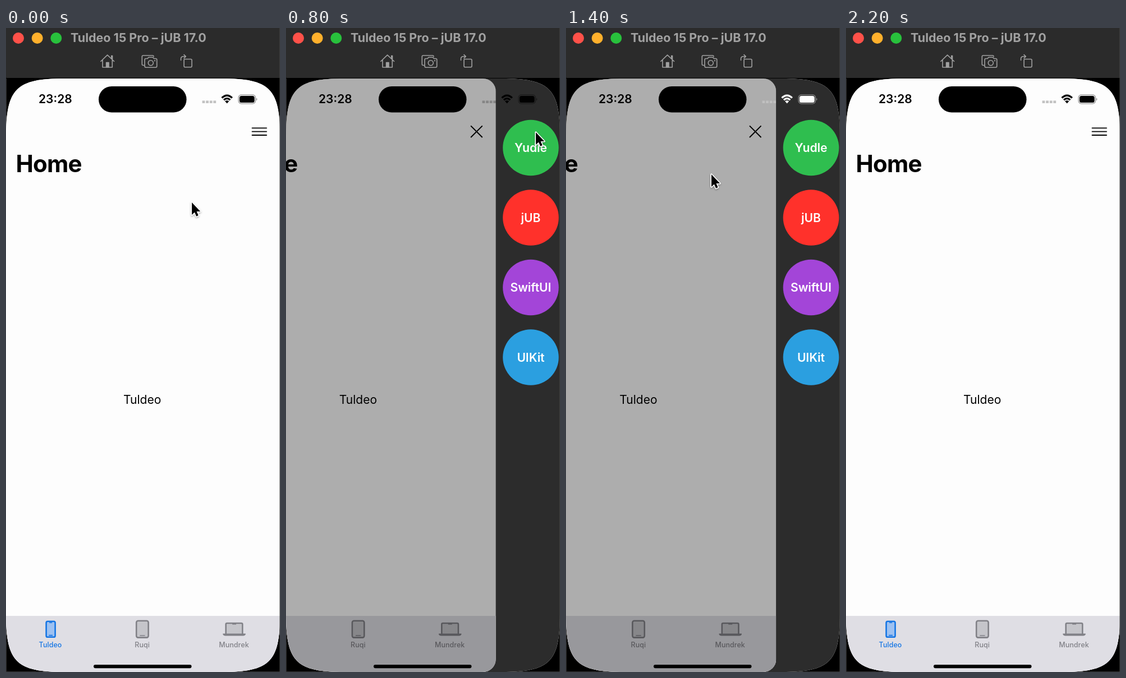
These frames come from a looping animation (488 by 1148 pixels, 2300 ms). An HTML page:

```html
<!DOCTYPE html>
<html lang="en">
<head>
<meta charset="utf-8">
<title>Side menu demo</title>
<style>
  html, body { margin: 0; width: 100%; height: 100%; overflow: hidden; background: #000; }
  svg { display: block; width: 100%; height: 100%; }
  text { font-family: Inter, "Open Sans", sans-serif; font-size: 21px; }
  .mid { text-anchor: middle; }
  .semi { font-weight: 600; }
  .tab { font-size: 12.4px; font-weight: 500; letter-spacing: .1px; }
</style>
</head>
<body>
<svg viewBox="0 0 488 1148">
  <defs>
    <clipPath id="screenClip">
      <path d="M0 194C0 108 18 90 104 90H384C470 90 488 108 488 194V1044C488 1130 470 1148 384 1148H104C18 1148 0 1130 0 1044Z"/>
    </clipPath>
    <clipPath id="panelClip"><rect id="panelShape" x="-100" y="90" width="588" height="1058"/></clipPath>
    <filter id="shadow" x="-50%" y="-50%" width="200%" height="200%">
      <feDropShadow dx="0" dy="1.5" stdDeviation="1.5" flood-opacity=".35"/>
    </filter>
  </defs>

  <!-- simulator window -->
  <rect width="488" height="1148"/>
  <rect width="488" height="89" fill="#2b2b2b"/>
  <path d="M.5 90V1148M0 1147.5H488" stroke="#333"/>
  <circle cx="22" cy="18" r="10" fill="#ff5149"/>
  <circle cx="55.7" cy="18" r="10" fill="#ffb02c"/>
  <circle cx="89.3" cy="18" r="10" fill="#28c13c"/>
  <text x="115" y="25" font-weight="700" style="font-size:21.5px" fill="#a1a1a1">Tuldeo 15 Pro – jUB 17.0</text>
  <g fill="none" stroke="#a1a1a1" stroke-width="1.6" stroke-linejoin="round" stroke-linecap="round">
    <path d="M168.8 59.5L180.6 48.2 192.6 59.5M172 57V70H189.3V57M187.8 54V49.5H189.5V55.5"/>
    <rect x="178.6" y="61.5" width="4.4" height="8.5" fill="#a1a1a1"/>
    <path d="M246 66.5H244.3Q242.3 66.5 242.3 64.5V51Q242.3 49 244.3 49H261Q263 49 263 51"/>
    <path d="M249.3 54.5H252L254 52.3H261.5L263.5 54.5H266.5Q268.7 54.5 268.7 56.5V68Q268.7 70.2 266.5 70.2H249.3Q247 70.2 247 68V56.5Q247 54.5 249.3 54.5Z"/>
    <circle cx="257.8" cy="62.3" r="4.5"/>
    <circle cx="265" cy="58.3" r=".4"/>
    <rect x="317" y="55.5" width="14" height="14.3" rx="2"/>
    <path d="M311.5 57.5V55Q311.5 50.8 316 50.8H319.5M317 47.6L320.3 50.8 317 54"/>
  </g>

  <g clip-path="url(#screenClip)">
    <rect y="90" width="488" height="1058" fill="#fdfdfd"/>
    <rect id="drawer" y="90" width="488" height="1058" fill="#2c2c2c"/>
    <g id="drawerItems"></g>

    <g id="panel" clip-path="url(#panelClip)">
      <rect x="-100" y="90" width="588" height="1058" fill="#fdfdfd"/>
      <text x="17.5" y="257" font-weight="700" style="font-size:42px;letter-spacing:-.02em">Home</text>
      <text class="mid" x="242.7" y="670">Tuldeo</text>
      <rect x="-100" y="1048" width="588" height="100" fill="#dfdee4"/>
      <g stroke="#1475e4" fill="#9dc1f1" stroke-width="2.6">
        <rect x="71.6" y="1057.8" width="16" height="28" rx="2.6"/>
        <path d="M77 1060H82.2M76.3 1082.7H83" stroke-width="1.7"/>
      </g>
      <g stroke="#818187" fill="#c5c5ca" stroke-width="2.6">
        <rect x="232.2" y="1056.8" width="21.4" height="29.8" rx="3"/>
        <path d="M238.3 1083H247.5" stroke-width="1.7"/>
        <path d="M391.6 1080V1063Q391.6 1061 393.6 1061H419.2Q421.2 1061 421.2 1063V1080"/>
        <path d="M403 1062.5H410" stroke-width="2.2"/>
        <path d="M386.5 1080H426.5Q426 1083 423 1083H390Q387 1083 386.5 1080Z" fill="#818187" stroke-width="1"/>
      </g>
      <text class="mid tab" x="79" y="1104" fill="#1475e4">Tuldeo</text>
      <text class="mid tab" x="242.7" y="1104" fill="#818187">Ruqi</text>
      <text class="mid tab" x="406" y="1104" fill="#818187">Mundrek</text>
      <rect id="dim" x="-100" y="90" width="588" height="1058"/>
      <path id="menuIcon" d="M437.7 178.4H464.7M437.7 184.7H464.7M437.7 191H464.7" stroke="#000" stroke-width="1.8"/>
      <path id="closeIcon" d="M-10.3-10.3L10.3 10.3M10.3-10.3L-10.3 10.3" stroke="#000" stroke-width="2"/>
    </g>

    <!-- status bar -->
    <text class="semi" x="58" y="134">23:28</text>
    <rect x="165" y="104" width="156.5" height="46.5" rx="23.2"/>
    <g id="status">
      <path d="M349.5 131.8H374.5" stroke="currentColor" stroke-width="4.6" stroke-dasharray="4.8 1.8" opacity=".23"/>
      <g fill="none" stroke="currentColor" stroke-width="3.2">
        <path d="M384.4 124.6Q393.6 116 402.8 124.6"/>
        <path d="M387.9 128.2Q393.6 123 399.3 128.2"/>
      </g>
      <path d="M390 130.6Q393.6 127.8 397.2 130.6L393.6 134.4Z" fill="currentColor"/>
      <rect x="414" y="119.2" width="30.4" height="15.6" rx="5" fill="none" stroke="currentColor" stroke-width="1.2" opacity=".45"/>
      <rect x="415.8" y="121" width="26.8" height="12" rx="3.6" fill="currentColor"/>
      <path d="M445.8 124.5Q449 127 445.8 129.7Z" fill="currentColor" opacity=".45"/>
    </g>
    <rect x="156" y="1135" width="174.5" height="6.2" rx="3.1"/>
  </g>
  <path d="M487.5 0V1148" stroke="#4a4a48" opacity=".7"/>

  <g id="cursor" filter="url(#shadow)">
    <path d="M0 0V25L5.6 19.8 9.2 28 13.2 26.2 9.7 18.2H17.2L0 0Z" transform="scale(.88)" stroke="#fff" stroke-width="3.6" paint-order="stroke" stroke-linejoin="round"/>
  </g>
</svg>

<script>
const LOOP = 2300, STEP = 100;
const OPEN_AT = 700, CLOSE_AT = 1396.4, SETTLE = 40;
const DRAWER_WIDTH = 124.5, DIM = 0.347;

// time, x, y of the pointer tip
const POINTER = [
  [0, 331, 311], [500, 445, 187], [800, 445, 186], [1100, 269, 258],
  [1400, 259, 261], [1600, 260, 262], [2000, 430, -40], [LOOP, 430, -40]
];

const get = id => document.getElementById(id);
const clamp = v => Math.min(1, Math.max(0, v));
const mix = (a, b, k) => a + (b - a) * k;
const ramp = (t, from, to) => clamp((t - from) / (to - from));

const items = [['Yudle', '#2fbe4f'], ['jUB', '#ff312b'], ['SwiftUI', '#a345d8'], ['UIKit', '#2b9fe0']];
get('drawerItems').innerHTML = items.map(([label, color], i) => {
  const x = 488 + DRAWER_WIDTH / 2, y = 213.5 + i * 124.5;
  return `<circle cx="${x}" cy="${y}" r="49.8" fill="${color}"/>
    <text class="mid semi" x="${x}" y="${y + 7.5}" fill="#fff">${label}</text>`;
}).join('');

function openness(t) {
  if (t < OPEN_AT) return 0;
  return t < CLOSE_AT ? 1 - Math.exp((OPEN_AT - t) / SETTLE) : Math.exp((CLOSE_AT - t) / SETTLE);
}

function pointerAt(t) {
  const i = POINTER.findIndex(p => p[0] > t);
  const [t0, x0, y0] = POINTER[i - 1], [t1, x1, y1] = POINTER[i];
  const k = ramp(t, t0, t1), eased = k * k * (3 - 2 * k);
  return [mix(x0, x1, eased), mix(y0, y1, eased)];
}

function render(t) {
  const open = openness(t);
  const slide = `translate(${-DRAWER_WIDTH * open} 0)`;
  get('panel').setAttribute('transform', slide);
  get('drawerItems').setAttribute('transform', slide);
  get('panelShape').setAttribute('rx', 25 * open);
  get('drawer').setAttribute('opacity', clamp(open * 2.1));
  get('dim').setAttribute('opacity', DIM * open);

  const cross = clamp((open - 0.05) / 0.5);
  get('menuIcon').setAttribute('opacity', 1 - cross);
  get('closeIcon').setAttribute('opacity', cross);
  get('closeIcon').setAttribute('transform', `translate(${t < CLOSE_AT ? 453.7 : 451} 184.7)`);

  const light = 255 * (ramp(t, 800, 1130) - ramp(t, 1500, 1830));
  get('status').style.color = `rgb(${light}, ${light}, ${light})`;

  get('cursor').setAttribute('transform', `translate(${pointerAt(t)})`);
}

// The picture advances ten times a second; the lead covers half a display refresh.
function tick() {
  const t = (performance.now() + 8) % LOOP;
  render(Math.floor(t / STEP) * STEP);
  requestAnimationFrame(tick);
}
tick();
</script>
</body>
</html>
```
